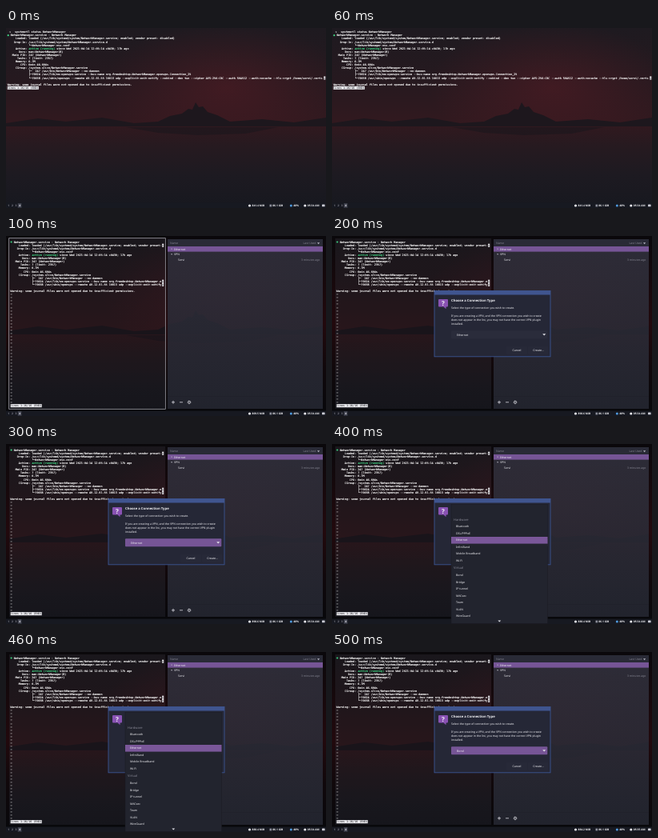
Write an HTML page that moves like this. It is 400x225 px and loops after 0.6 s.

```html
<!DOCTYPE html>
<html lang="en">
<head>
<meta charset="utf-8">
<title>Network connection setup</title>
<style>
html, body { margin: 0; width: 100%; height: 100%; overflow: hidden; background: #0b0b0f; }
svg { display: block; width: 100vw; height: 100vh; }
text { white-space: pre; text-rendering: geometricPrecision; fill: #f2f2f6; font: 500 3.5px "Noto Sans", "Open Sans", sans-serif; }
.term text { font: 3.42px "DejaVu Sans Mono", "Liberation Mono", monospace; fill: #fff; stroke: #fff; stroke-width: .14; }
.term .inv { fill: #141318; stroke: none; }
.term .ok { fill: #3fdc86; stroke: #3fdc86; }
.bold { font-weight: bold; }
.bar text { font-size: 3.3px; font-weight: 600; }
.dim { fill: #858592; }
</style>
</head>
<body>
<svg viewBox="0 0 400 225" preserveAspectRatio="none">
  <defs>
    <linearGradient id="sky" x2="0" y2="1">
      <stop offset="0" stop-color="#1e1a20"/>
      <stop offset=".3" stop-color="#26191f"/>
      <stop offset=".54" stop-color="#32191f"/>
      <stop offset=".7" stop-color="#241a21"/>
      <stop offset="1" stop-color="#17181f"/>
    </linearGradient>
    <radialGradient id="glow">
      <stop offset="0" stop-color="#5a1c25" stop-opacity=".5"/>
      <stop offset="1" stop-color="#5a1c25" stop-opacity="0"/>
    </radialGradient>
    <linearGradient id="water" x2="0" y2="1">
      <stop offset="0" stop-color="#30191f"/>
      <stop offset=".25" stop-color="#261a20"/>
      <stop offset=".6" stop-color="#1d1a21"/>
      <stop offset="1" stop-color="#17181f"/>
    </linearGradient>
    <linearGradient id="gap" x2="0" y2="1">
      <stop offset="0" stop-color="#0a080b"/>
      <stop offset=".5" stop-color="#22090d"/>
      <stop offset=".75" stop-color="#10080b"/>
      <stop offset="1" stop-color="#08080b"/>
    </linearGradient>
    <linearGradient id="panel" x2="0" y2="1">
      <stop offset="0" stop-color="#2f2f3b"/>
      <stop offset="1" stop-color="#23252f"/>
    </linearGradient>
  </defs>

  <g id="wall">
    <rect width="400" height="225" fill="url(#sky)"/>
    <ellipse cx="275" cy="74" rx="155" ry="80" fill="url(#glow)"/>
    <path d="M0 119L40 113L75 117L120 112L160 119L190 117L205 110L220 107L228 101L233 102L237 93L241 99L246 98L252 105L264 109L280 117L320 114L360 118L400 112V128H0Z" fill="#1d171d"/>
    <rect y="123" width="400" height="102" fill="url(#water)"/>
    <path d="M150 124H340L300 132L240 134L190 131Z" fill="#1d171d" opacity=".7"/>
  </g>

  <g id="full" class="term"></g>

  <g id="split">
    <path d="M0 0H400V219H0ZM4 3V216H199V3ZM202 4V216H396V4Z" fill="url(#gap)" fill-rule="evenodd"/>
    <rect x="4" y="3" width="195" height="213" fill="#0d0d12" opacity=".25"/>
    <rect id="edge" x="3.7" y="2.7" width="195.6" height="213.6" fill="none" stroke="#b4b4bd" stroke-width=".7"/>
    <g id="half" class="term"></g>
    <g id="list">
      <rect x="202" y="4" width="194" height="212" fill="url(#panel)" opacity=".86"/>
      <rect x="202" y="4" width="194" height="9" fill="#292a36"/>
      <rect x="202" y="13" width="194" height="6.6" fill="#765596"/>
      <rect x="202" y="200.5" width="194" height=".4" fill="#1c1d26"/>
      <path d="M389 8.2h3.2l-1.6 2zM206 15.7h2.2l-1.1 1.4zM206 22.3h2.2l-1.1 1.4z" fill="#b8b8c4"/>
      <path d="M207 207.8h4M209 205.8v4M217 207.8h4" stroke="#d8d8e0" stroke-width=".8"/>
      <circle cx="229" cy="207.8" r="1.4" fill="none" stroke="#d8d8e0" stroke-width=".8"/>
      <circle cx="229" cy="207.8" r="2" fill="none" stroke="#d8d8e0" stroke-width=".6" stroke-dasharray=".8 .77"/>
    </g>
  </g>

  <g id="dialog">
    <rect x="128" y="68.5" width="145" height="82.3" fill="#252736" stroke="#3b5593" stroke-width=".9"/>
    <rect x="128" y="68.5" width="145" height="5" fill="#40558f"/>
    <path d="M134 79h10a1 1 0 0 1 1 1v7.5a1 1 0 0 1-1 1h-1.5v2.8l-3-2.8H134a1 1 0 0 1-1-1V80a1 1 0 0 1 1-1z" fill="#8952b3"/>
    <rect id="combo" x="149" y="118.2" width="120.3" height="10" rx="1"/>
    <path d="M263.2 122.3h4l-2 2.2z" fill="#e4e4ea"/>
    <g fill="#272938">
      <rect x="217.5" y="138" width="26.5" height="10" rx="1"/>
      <rect x="245" y="138" width="25" height="10" rx="1"/>
    </g>
  </g>

  <g id="bar" class="bar">
    <rect y="218.6" width="400" height="6.4" fill="#171921"/>
    <rect x="14.8" y="219.2" width="4.6" height="5.4" fill="#454754"/>
    <circle cx="304.5" cy="222" r="1.6" fill="#e8e8ee"/>
    <rect x="329.5" y="220.6" width="2.6" height="2.8" fill="#8d8f9c"/>
    <circle cx="356.3" cy="222" r="1.5" fill="#4f9be0"/>
    <circle cx="373.8" cy="222" r="1.6" fill="#e8e8ee"/>
    <rect x="395" y="220.5" width="3.6" height="2.8" rx=".5" fill="#c9cad3"/>
  </g>

  <g id="menu">
    <rect x="149" y="75.5" width="120.5" height="148.8" fill="#22242e" stroke="#1a1b23" stroke-width=".5"/>
    <rect x="149" y="116" width="120.5" height="8.6" fill="#7a5799"/>
    <path d="M207.4 220.4h3.8l-1.9 2z" fill="#e4e4ea"/>
  </g>
</svg>
<script>
const $ = id => document.getElementById(id);
const NS = "http://www.w3.org/2000/svg";
const CW = 2.06, LH = 4.09;

function add(parent, tag, attrs, content = "") {
  const el = document.createElementNS(NS, tag);
  for (const k in attrs) el.setAttribute(k, attrs[k]);
  el.textContent = content;
  return parent.appendChild(el);
}
const label = (id, x, y, s, cls = "", anchor = "start") =>
  add($(id), "text", { x, y, class: cls, "text-anchor": anchor }, s);

const report = [
  "  NetworkManager.service - Network Manager",
  "     Loaded: loaded (/usr/lib/systemd/system/NetworkManager.service; enabled; vendor preset: disabled)",
  "    Drop-In: /usr/lib/systemd/system/NetworkManager.service.d",
  "             └─NetworkManager-ovs.conf",
  "     Active:                  since Wed 2021-04-14 12:05:14 +0430; 17h ago",
  "       Docs: man:NetworkManager(8)",
  "   Main PID: 247 (NetworkManager)",
  "      Tasks: 7 (limit: 2357)",
  "     Memory: 6.7M",
  "        CPU: 6min 46.604s",
  "     CGroup: /system.slice/NetworkManager.service",
  "             ├─  247 /usr/bin/NetworkManager --no-daemon",
  "             ├─79024 /usr/lib/nm-openvpn-service --bus-name org.freedesktop.NetworkManager.openvpn.Connection_25",
  "             └─79038 /usr/sbin/openvpn --remote 49.12.91.55 10013 udp --explicit-exit-notify --nobind --dev tun" +
    " --cipher AES-256-CBC --auth SHA512 --auth-nocache --tls-crypt /home/sorvi/.certs/",
  "",
  "Warning: some journal files were not opened due to insufficient permissions."
];

function inverse(id, x, y, s) {
  add($(id), "rect", { x, y: y - 3.1, width: s.length * CW, height: LH, fill: "#ececf0" });
  label(id, x, y, s, "inv");
}

function pager(id, x, y, cols, rows) {
  report.forEach((s, i) => {
    const by = y + i * LH;
    label(id, x, by, s.slice(0, cols - 1));
    if (s.length >= cols) inverse(id, x + (cols - 1) * CW, by, ">");
  });
  add($(id), "circle", { cx: x + 1, cy: y - 1.2, r: 1.1, fill: "#3fdc86" });
  label(id, x + 13 * CW, y + 4 * LH, "active (running)", "ok");
  for (let i = report.length; i < rows; i++) label(id, x, y + i * LH, "~");
  inverse(id, x, y + rows * LH, "lines 1-16/16 (END)");
}

label("full", 4, 6.3, "→");
label("full", 11, 6.3, "systemctl status NetworkManager");
pager("full", 1.7, 6.3 + LH, 193, 16);
pager("half", 5.6, 8.7, 93, 50);

label("list", 205, 10.4, "Name", "dim");
label("list", 387.5, 10.4, "Last Used", "dim", "end");
label("list", 210, 17.7, "Ethernet");
label("list", 210, 24.2, "VPN");
label("list", 215, 31, "Sorvi");
label("list", 392.5, 31, "3 minutes ago", "dim", "end");

label("dialog", 139, 87, "?", "bold", "middle").style.fontSize = "8px";
label("dialog", 149, 82.3, "Choose a Connection Type", "bold").style.fontSize = "4.2px";
[
  [91.2, "Select the type of connection you wish to create."],
  [100.9, "If you are creating a VPN, and the VPN connection you wish to create"],
  [106.1, "does not appear in the list, you may not have the correct VPN plugin"],
  [111.3, "installed."]
].forEach(([y, s]) => label("dialog", 149, y, s));
const choice = label("dialog", 156, 124.6, "");
label("dialog", 231, 144.2, "Cancel", "", "middle");
label("dialog", 258, 144.2, "Create…", "", "middle");

const section = (title, y, items) => {
  label("menu", 152, y, title, "dim").style.fontSize = "4px";
  items.forEach((s, i) => label("menu", 155, y + 8.6 + i * 8.52, s));
};
section("Hardware", 95.5, ["Bluetooth", "DSL/PPPoE", "Ethernet", "InfiniBand", "Mobile Broadband", "Wi-Fi"]);
section("Virtual", 156.4, ["Bond", "Bridge", "IP tunnel", "MACsec", "Team", "VLAN", "WireGuard"]);

["1", "2", "3", "4"].forEach((s, i) => label("bar", 2.2 + i * 4.7, 223.2, s, i < 3 ? "dim" : ""));
const memory = label("bar", 307.5, 223.2, "");
label("bar", 333.2, 223.2, "86.1 GiB");
label("bar", 359.2, 223.2, "48%");
const clock = label("bar", 376.8, 223.2, "");

// view: 0 terminal, 1 split, 2 dialog, 3 open menu
const steps = [
  { view: 0, mem: "841.4" },
  { view: 1, mem: "869.5" },
  { view: 2, mem: "898.6" },
  { view: 2, mem: "898.6", hover: true },
  { view: 3, mem: "888.4", hover: true },
  { view: 2, mem: "884.2", hover: true, pick: "Bond", time: "05:35 AM" }
];

const show = (id, on) => { $(id).style.display = on ? "" : "none"; };
let last = -1;

function draw(now) {
  const n = Math.floor(now % 600 / 100);
  if (n === last) return;
  last = n;
  const { view, mem, hover, pick = "Ethernet", time = "05:34 AM" } = steps[n];
  show("full", view === 0);
  show("split", view > 0);
  show("edge", view === 1);
  show("dialog", view > 1);
  show("menu", view === 3);
  $("combo").setAttribute("fill", hover ? "#765596" : "#2a2c3b");
  choice.textContent = pick;
  memory.textContent = mem + " MiB";
  clock.textContent = time;
}
const start = performance.now();
function tick() {
  draw(performance.now() - start);
  requestAnimationFrame(tick);
}
tick();
</script>
</body>
</html>
```
